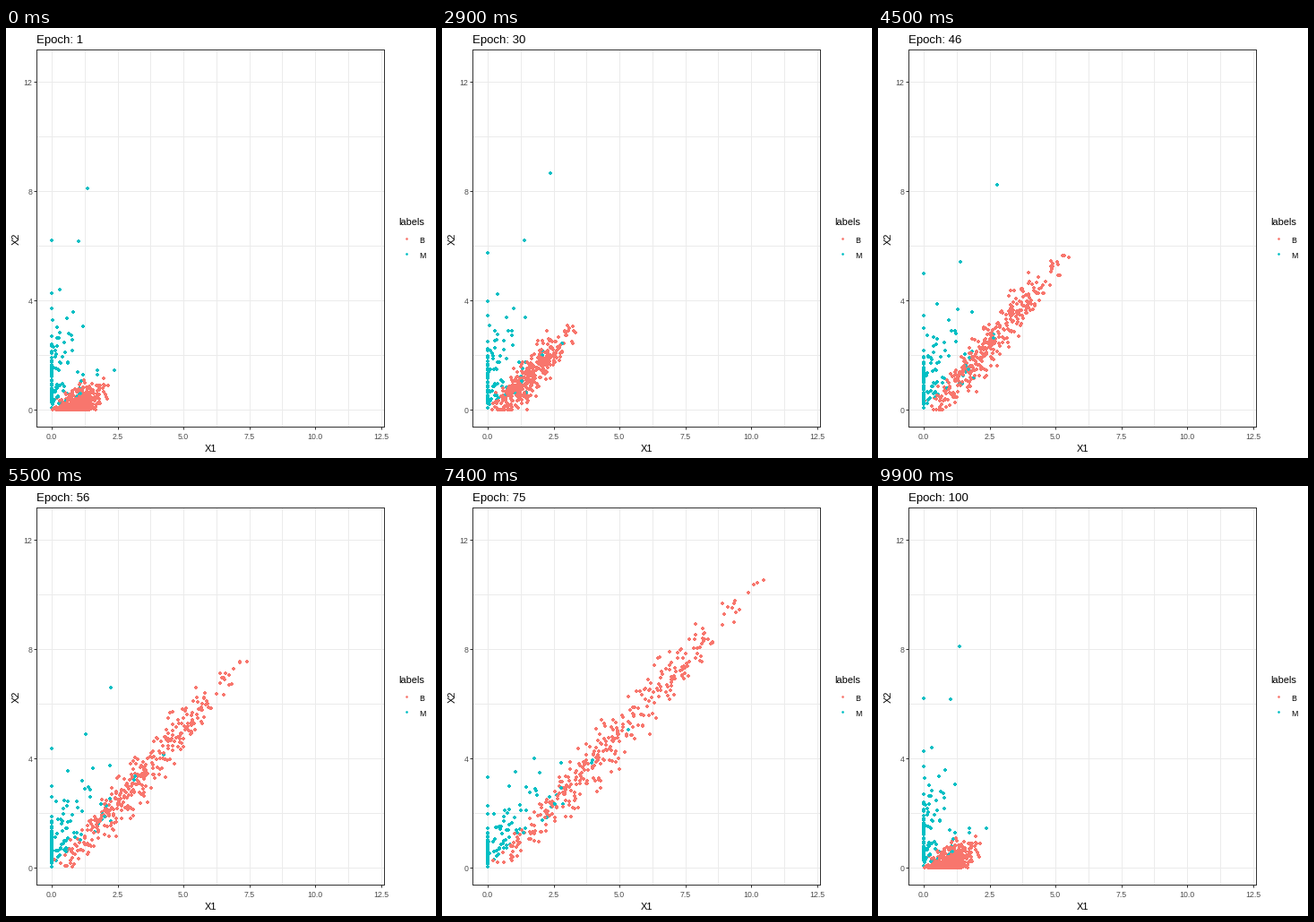
Write a matplotlib script that moves like this. It is 480 by 480 pixels and loops after 10 s.

```python
import matplotlib.pyplot as plt
import numpy as np
from matplotlib.animation import FuncAnimation

SIZE, FRAMES = 480, 100
LAST = FRAMES - 2  # final step of the growth; the next one is back at the start
RED, TEAL = "#F8766D", "#00BFC4"
LEFT, TOP, RIGHT, BOTTOM = 34.2, 24.2, 422.2, 445.2  # panel in pixels
X0, Y0, SX, SY = 51.15, 426, 29.4, 30.475  # data origin and pixels per unit
rng = np.random.default_rng(11)
plt.rcParams["font.family"] = "Liberation Sans"


def grow(t, mid, width):
    """Logistic rise, exactly 0 at the start and 1 at LAST."""
    s = 1 / (1 + np.exp((mid - np.array([t, 0, LAST])) / width))
    return (s[0] - s[1]) / (s[2] - s[1])


def lerp(a, b, u):
    return a + (b - a) * u


# Class B starts as a low clump and stretches along the diagonal.
NB, NM = 345, 130
rank = rng.beta(2.1, 3.1, NB)
rank /= rank.max()
jitter, noise = np.clip(rng.normal(size=(2, NB)), -2.3, 2.3)
b_x0 = .22 + 1.8 * rank + .2 * jitter
b_y0 = -.12 + .75 * rank + .28 * noise
b_x1 = 11.98 * rank
b_y1 = 1.04 * b_x1 - .25 + (.1 + .5 * np.sin(np.pi * rank)) * noise

# Class M: about half sits on the left edge, the rest leans over and sinks.
m_x0 = rng.normal(-.1, .75, NM)
m_y0 = rng.gamma(2.2, .6, NM)

# Two M points far above the others.
FAR_T = [0, 29, 45, 65, 84, LAST]
FAR_X = [[1.36, 2.38, 2.8, 1.7, 1.8, 1.6], [1.02, 1.4, 1.4, 1.18, .92, .7]]
FAR_Y = [[8.12, 8.65, 8.22, 4.97, 2.9, 2.2], [6.18, 6.2, 5.4, 4.35, 2.55, 1.5]]

order = rng.permutation(NB + NM + 2)
colors = np.repeat([RED, TEAL], [NB, NM + 2])[order]


def positions(t):
    """Dot centres in whole pixels; values below zero stick to the axes."""
    gx, gy = grow(t, 53.5, 13.5), grow(t, 49, 16)
    m_x = m_x0 * lerp(1, 2.4, gx) + .2 * gx
    m_y = m_y0 * lerp(1, .45, gx) + .8 * min(1, t / 60) * np.maximum(m_x, 0)
    far_x = [np.interp(t, FAR_T, v) for v in FAR_X]
    far_y = [np.interp(t, FAR_T, v) for v in FAR_Y]
    x = np.concatenate([lerp(b_x0, b_x1, gx), m_x, far_x])
    y = np.concatenate([lerp(b_y0, b_y1, gy), m_y, far_y])
    x, y = np.maximum([x, y], 0)[:, order]
    return np.round(np.column_stack([X0 + SX * x, Y0 - SY * y]))


fig = plt.figure(figsize=(SIZE / 72, SIZE / 72), dpi=72, facecolor="white")
ax = fig.add_axes([LEFT / SIZE, 1 - BOTTOM / SIZE,
                   (RIGHT - LEFT) / SIZE, (BOTTOM - TOP) / SIZE])
ax.set(xlim=((LEFT - X0) / SX, (RIGHT - X0) / SX),
       ylim=((Y0 - BOTTOM) / SY, (Y0 - TOP) / SY))
ax.set_xticks(np.arange(0, 13, 2.5))
ax.set_xticks(np.arange(1.25, 12, 2.5), minor=True)
ax.set_yticks([0, 4, 8, 12])
ax.set_yticks([2, 6, 10], minor=True)
ax.grid(which="both", color="#EBEBEB", lw=1)
ax.set_axisbelow(True)
ax.tick_params(length=3, width=1, color="#333333", labelcolor="#4D4D4D", labelsize=8.8)
ax.tick_params(axis="x", pad=4)
ax.tick_params(axis="y", pad=2)
ax.tick_params(which="minor", length=0)
for spine in ax.spines.values():
    spine.set(color="#333333", lw=1)

# Dots live on a stage-wide layer measured in pixels.
stage = fig.add_axes([0, 0, 1, 1], frameon=False)
stage.set(xlim=(0, SIZE), ylim=(SIZE, 0))
stage.axis("off")


def add_dots(points, color):
    return stage.scatter(*np.transpose(points), c=color, s=2.7 ** 2, lw=0,
                         antialiased=False)


def label(x, y, text, size, **kw):
    return fig.text(x / SIZE, 1 - y / SIZE, text, fontsize=size, color="black", **kw)


dots = add_dots(positions(0), colors)
title = label(33.5, 16.5, "", 13.2)
label(228, 473, "X1", 11, ha="center")
label(11.5, 235.5, "X2", 11, ha="center", va="center", rotation=90)
label(438.5, 220, "labels", 11)
for y, name, color in [(235, "B", RED), (252, "M", TEAL)]:
    add_dots([(447, y)], color)
    label(461.5, y + 5, name, 8.8)


def draw(i):
    dots.set_offsets(positions(i % (LAST + 1)))
    title.set_text(f"Epoch: {i + 1}")
    return dots, title


anim = FuncAnimation(fig, draw, frames=FRAMES, interval=100, repeat=True,
                     repeat_delay=0, blit=False)
plt.show()
```
